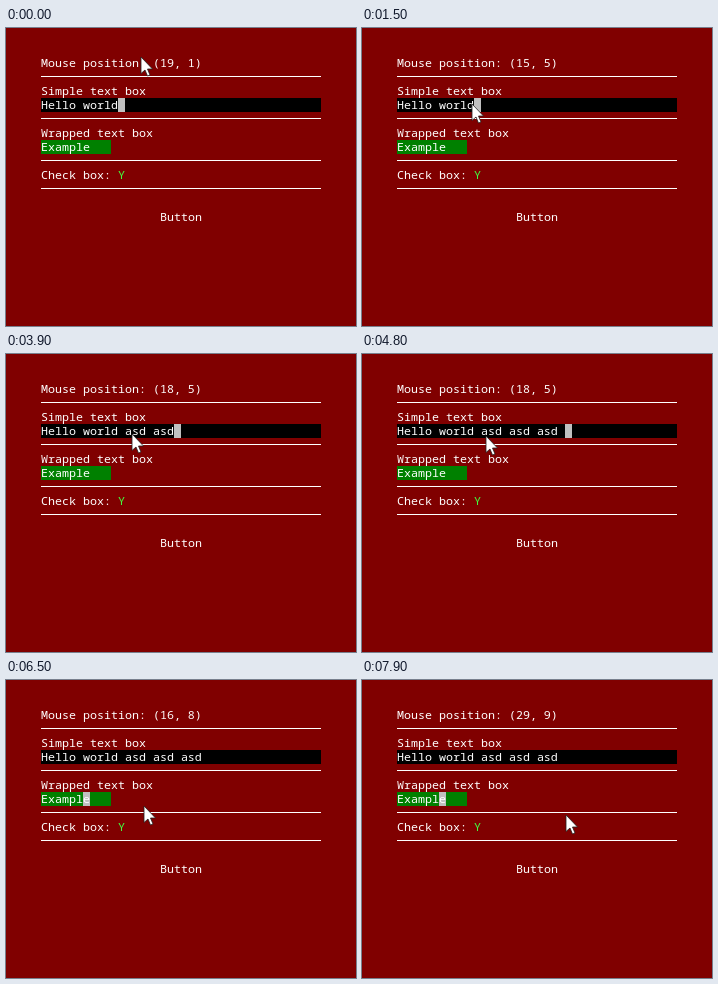
These frames come from a looping animation (350 by 298 pixels, 8000 ms). An HTML page:

```html
<!DOCTYPE html>
<html lang="en">
<head>
<meta charset="utf-8">
<title>Text form</title>
<style>
  html, body { margin: 0; width: 100%; height: 100%; overflow: hidden; background: #800000; }
  svg { display: block; width: 350px; height: 298px; }
  text { font: 11.667px "Noto Sans Mono", "DejaVu Sans Mono", monospace; fill: #fff; white-space: pre; }
</style>
</head>
<body>
<svg viewBox="0 0 350 298">
  <rect width="350" height="298" fill="#800000"/>
  <path d="M35 48.5H315M35 90.5H315M35 132.5H315M35 160.5H315" stroke="#fff"/>
  <rect x="35" y="70" width="280" height="14"/>
  <rect x="35" y="112" width="70" height="14" fill="#008000"/>
  <rect id="caret" width="7" height="14" fill="#c0c0c0"/>
  <text id="status" x="35" y="39"></text>
  <text x="35" y="67">Simple text box</text>
  <text id="entry" x="35" y="81"></text>
  <text x="35" y="109">Wrapped text box</text>
  <text x="35" y="123">Example</text>
  <text x="35" y="151">Check box: <tspan fill="#40ff40">Y</tspan></text>
  <text x="154" y="193">Button</text>
  <path id="mouse" d="M0 0V16.5L4 13L6.5 19L9 18L6.5 12H11.5Z" fill="#fff" stroke="#222" stroke-width=".8"/>
</svg>
<script>
const LOOP = 8000, STEP = 100, CELL_W = 7, CELL_H = 14, LEFT = 35;
const BASE = 'Hello world', TYPED = ' asd'.repeat(3) + ' ';
const FOCUS_TIME = 5900;

// Pointer moves: start, end, then where the tip arrives
const moves = [
  [-100, 0, 135, 29], [0, 500, 134, 10], [500, 600, 120, 4], [600, 900, 205, 11],
  [900, 1400, 108, 75], [1400, 1900, 126, 80], [4700, 5400, 89, 118],
  [5800, 6000, 72, 117], [6100, 6900, 204, 135],
  [7000, 7400, 76, 122], [7400, 7800, 204, 135]
];

// Typing bursts: start, characters, time per character
const bursts = [[2300, 1, 100], [3200, 3, 50], [3500, 4, 100], [4400, 5, 50]];

const [caret, status, entry, mouse] =
  ['caret', 'status', 'entry', 'mouse'].map(id => document.getElementById(id));

const clamp = (v, lo, hi) => Math.min(hi, Math.max(lo, v));
const ease = k => k * k * (3 - 2 * k);

function pointer(t) {
  let x = 134, y = 20;
  for (const [start, end, toX, toY] of moves) {
    const k = ease(clamp((t - start) / (end - start), 0, 1));
    x += (toX - x) * k;
    y += (toY - y) * k;
  }
  return [x, y];
}

function typedCount(t) {
  return bursts.reduce((sum, [start, count, gap]) =>
    sum + clamp(Math.floor((t - start) / gap) + 1, 0, count), 0);
}

function draw(t) {
  const [x, y] = pointer(t).map(Math.round);
  mouse.setAttribute('transform', `translate(${x} ${y})`);

  // The readout trails the pointer by one step
  const [px, py] = pointer(t - STEP);
  status.textContent =
    `Mouse position: (${Math.floor(px / CELL_W)}, ${Math.floor(py / CELL_H)})`;

  const value = BASE + TYPED.slice(0, typedCount(t));
  entry.textContent = value;

  const wrapped = t >= FOCUS_TIME;
  caret.setAttribute('x', LEFT + CELL_W * (wrapped ? 6 : value.length));
  caret.setAttribute('y', wrapped ? 112 : 70);
}

const start = performance.now();
function tick() {
  const t = (performance.now() - start) % LOOP;
  draw(Math.floor(t / STEP) * STEP);
  requestAnimationFrame(tick);
}
tick();
</script>
</body>
</html>
```
